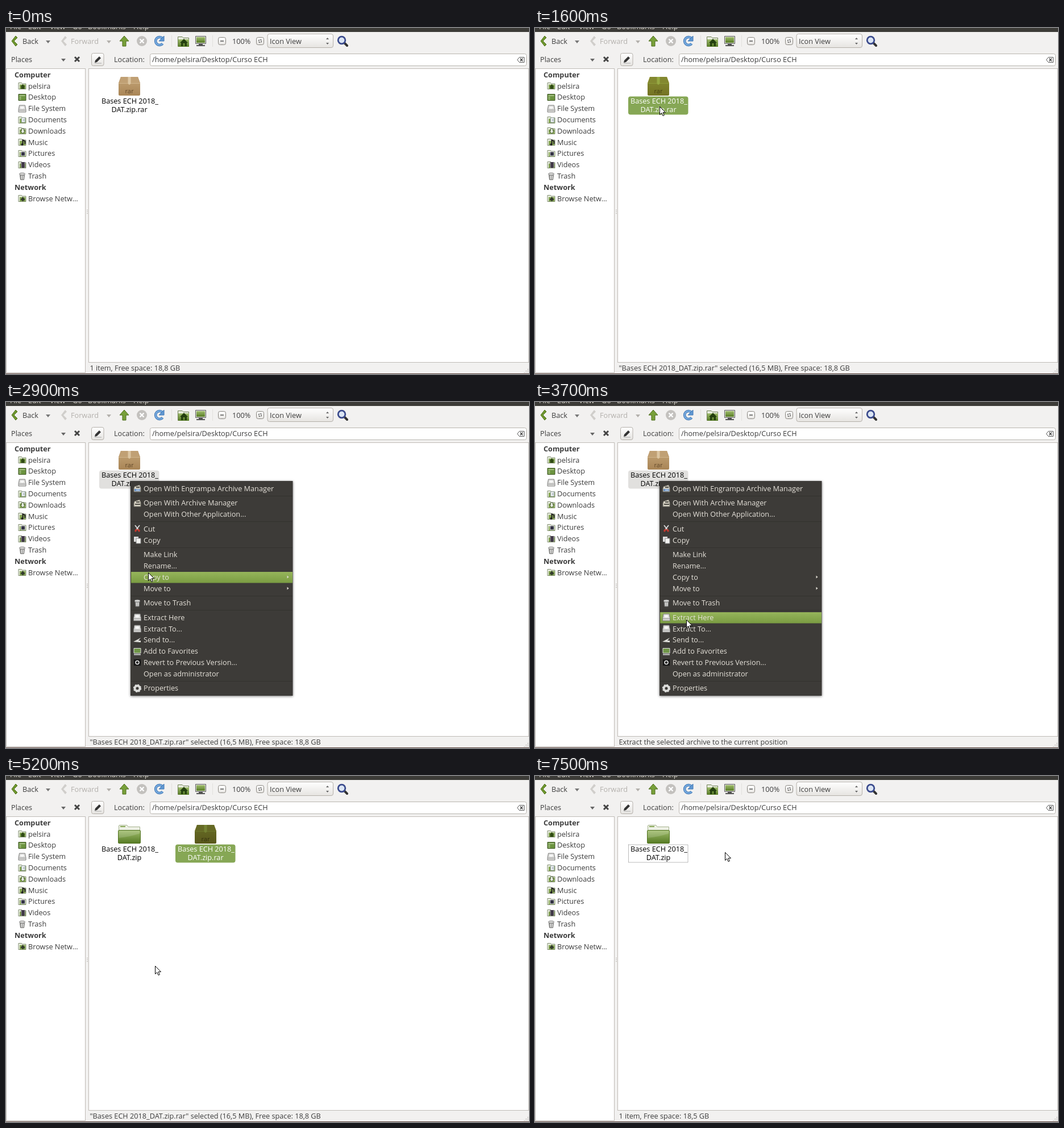
An HTML page that plays this animation: 920 px wide and 609 px high, repeating every 8 s.

```html
<!DOCTYPE html>
<html lang="en">
<head>
<meta charset="utf-8">
<title>File manager: extract an archive</title>
<style>
html, body { margin: 0; width: 100%; height: 100%; overflow: hidden; background: #f2f1f0; }
#stage { display: block; width: 920px; height: 609px; font: 12.68px "Open Sans", "Noto Sans", sans-serif; fill: #3c3c3c; }
.b { font-weight: 700; }
.mid { text-anchor: middle; }
.file { fill: #000; }
.off { fill: #b3b0ac; }
#menu text { fill: #e6e2da; }
.run { animation: 8s step-end infinite; }

#pointer { animation-name: pointer; }
@keyframes pointer {
  0% { transform: translate(64px, -30px); }
  1.25% { transform: translate(64px, 0); }
  2.5% { transform: translate(110px, 25px); }
  3.75% { transform: translate(150px, 50px); }
  5% { transform: translate(185px, 72px); }
  6.25% { transform: translate(207px, 88px); }
  7.5% { transform: translate(219px, 98px); }
  8.75% { transform: translate(225px, 105px); }
  16.25% { transform: translate(215px, 114px); }
  17.5% { transform: translate(209px, 126px); }
  18.75% { transform: translate(215px, 134px); }
  20% { transform: translate(219px, 138px); }
  36.25% { transform: translate(250px, 300px); }
  37.5% { transform: translate(255px, 328px); }
  38.75% { transform: translate(259px, 355px); }
  40% { transform: translate(262px, 374px); }
  42.5% { transform: translate(264px, 379px); }
  43.75% { transform: translate(266px, 383px); }
  57.5% { transform: translate(266px, 360px); }
  58.75% { transform: translate(266px, 343px); }
  61.25% { transform: translate(266px, 342px); }
  65% { transform: translate(262px, 334px); }
  70% { transform: translate(272px, 285px); }
  71.25% { transform: translate(284px, 235px); }
  73.75% { transform: translate(289px, 196px); }
  75% { transform: translate(294px, 165px); }
  76.25% { transform: translate(299px, 142px); }
  78.75% { transform: translate(313px, 140px); }
  80% { transform: translate(326px, 138px); }
  81.25% { transform: translate(334px, 136px); }
  83.75% { transform: translate(334px, 134px); }
}
#menu { animation-name: menu; }
@keyframes menu { 0%, 47.5% { opacity: 0; } 27.5% { opacity: 1; } }
#hot { animation-name: hot; }
@keyframes hot {
  0% { transform: translateY(299px); opacity: 0; }
  36.25% { transform: translateY(299px); opacity: 1; }
  37.5% { transform: translateY(318.5px); opacity: 1; }
  38.75% { transform: translateY(344.5px); opacity: 1; }
  40% { transform: translateY(370px); opacity: 1; }
}
#archive { animation-name: archive; }
@keyframes archive {
  0% { transform: none; opacity: 1; }
  52.5% { transform: translate(134px, 0); opacity: 1; }
  91.25% { transform: translate(134px, 0); opacity: 0; }
}
#box { isolation: isolate; animation-name: hover; }
@keyframes hover {
  0%, 27.5%, 91.25% { filter: brightness(1); }
  7.5%, 76.25% { filter: brightness(1.3); }
}
#tint { mix-blend-mode: multiply; animation-name: tint; }
@keyframes tint {
  0%, 27.5%, 70%, 91.25% { fill: transparent; }
  13.75%, 50%, 87.5% { fill: #86a850; }
}
#plate { animation-name: plate; }
@keyframes plate {
  0%, 70%, 91.25% { fill: transparent; }
  13.75%, 50%, 87.5% { fill: #86a755; }
  27.5% { fill: #e1e0de; }
}
#label { animation-name: label; }
@keyframes label {
  0%, 27.5%, 70%, 91.25% { fill: #000; }
  13.75%, 50%, 87.5% { fill: #fff; }
}
#folder { animation-name: folder; }
@keyframes folder { 0% { opacity: 0; } 52.5% { opacity: 1; } }
#focus { animation-name: focus; }
@keyframes focus { 0% { opacity: 0; } 93.75% { opacity: 1; } }
#status { animation-name: status; }
@keyframes status {
  0%, 91.25% { transform: translateY(0); }
  13.75%, 50%, 87.5% { transform: translateY(-30px); }
  38.75% { transform: translateY(-60px); }
  40% { transform: translateY(-90px); }
  70% { transform: translateY(-120px); }
  93.75% { transform: translateY(-150px); }
}
</style>
</head>
<body>
<svg id="stage" viewBox="0 0 920 609">
<defs>
  <linearGradient id="green" x2="0" y2="1"><stop stop-color="#a0bd6d"/><stop offset="1" stop-color="#567b24"/></linearGradient>
  <linearGradient id="bar" x2="0" y2="1"><stop stop-color="#96b55b"/><stop offset="1" stop-color="#7a9c42"/></linearGradient>
  <linearGradient id="front" x2="0" y2="1"><stop stop-color="#c3a477"/><stop offset="1" stop-color="#a98556"/></linearGradient>
  <linearGradient id="btn" x2="0" y2="1"><stop stop-color="#fff"/><stop offset="1" stop-color="#e6e4e1"/></linearGradient>
  <filter id="shade" x="-5%" y="-5%" width="110%" height="110%"><feDropShadow dx="0" dy="1" stdDeviation="2.2" flood-opacity=".55"/></filter>

  <path id="down" d="M-4-2H4L0 3Z"/>
  <path id="chevron" d="M7-9L10-6 4 0 10 6 7 9 0 0Z"/>
  <g id="dir">
    <path d="M-6.5 5.5V-5.5H-1L0-4H6.5V5.5Z" fill="#f0f2ea" stroke="#7f8c6c"/>
    <path d="M-4.5-2.5H6V5H-4.5Z" fill="#86a655"/>
  </g>
  <g id="home"><use href="#dir"/><path d="M-3 1L1-3 5 1H4V5H-2V1Z" fill="#2f4a14"/></g>
  <g id="desk"><path d="M-6.5-5.5h13v11h-13z" fill="#6c9440" stroke="#3d5523"/><path d="M-5-3H5M-5 0H-2M-5 3H-2" stroke="#d5e3c0"/></g>
  <g id="disk"><path d="M-5-6H5L6.5 2V6H-6.5V2Z" fill="#d9d9d7" stroke="#80807e"/><path d="M-6 2.5H6" stroke="#999"/><ellipse cy="-2" rx="3.5" ry="2" fill="#f7f7f7"/></g>
  <g id="docs"><use href="#dir"/><path d="M-1-4H5V4H-1Z" fill="#fff" stroke="#8b9b9b"/><path d="M1-1H4M1 1H4" stroke="#789"/></g>
  <g id="down2"><use href="#dir"/><path d="M-1-4H3V0H5L1 5-3 0H-1Z" fill="#e8eee2" stroke="#4b5d38"/></g>
  <g id="note"><use href="#dir"/><path d="M1 4V-4L5-2V3" fill="none" stroke="#222" stroke-width="2"/><circle cx="0" cy="4" r="2" fill="#222"/></g>
  <g id="pic"><use href="#dir"/><path d="M-2-3H5V4H-2Z" fill="#334" stroke="#ddd"/></g>
  <g id="film"><use href="#dir"/><path d="M-2-5H5V5H-2Z" fill="#3b3342"/><path d="M-1-4V5M4-4V5" stroke="#ccc" stroke-dasharray="1 1"/></g>
  <g id="bin"><path d="M-4-3H4L3 6H-3Z" fill="#a8a8a6" stroke="#6e6e6c"/><ellipse cy="-4" rx="5" ry="2" fill="#dededc" stroke="#777"/><path d="M-1-1V5M2-1V5" stroke="#eee"/></g>
  <g id="net"><use href="#dir"/><path d="M-3 2L1-3 5 2 1 5Z" fill="#333c2c"/></g>
  <g id="pack"><path d="M-5-3L4-6 6-1V6H-6V0Z" fill="#d4d0c2" stroke="#77746a"/><path d="M-4 2H5M-2-2H4" stroke="#4d4b45" stroke-width="2"/></g>
  <g id="packblue"><use href="#pack"/><path d="M-5 1H5V5H-5Z" fill="#6b92c4"/><path d="M-2 3H4" stroke="#fff"/></g>
  <g id="cut"><path d="M-4-6L3 3M4-6L-3 3" stroke="#ddd" stroke-width="1.8"/><path d="M-1 1L-4 5M1 1L4 5" stroke="#c0392f" stroke-width="3"/></g>
  <g id="copy"><path d="M-6-6H2V3H-6Z" fill="#ddd"/><path d="M-2-3H6V6H-2Z" fill="#f4f4f2" stroke="#888"/></g>
  <path id="send" d="M-7 3L6-4 2 1H6V4Z" fill="#dededa"/>
  <g id="screen"><path d="M-6-5.5H6V3H-6Z" fill="#6f9647" stroke="#ddd"/><path d="M-6 5.5H6" stroke="#ccc" stroke-width="2"/></g>
  <g id="back"><path d="M-6-5H6V6H-6Z" fill="#151515"/><circle r="3" cy=".5" fill="none" stroke="#eee" stroke-width="1.5"/></g>
  <g id="gear"><circle r="4.5" fill="none" stroke="#dcdcda" stroke-width="4" /><circle r="6" fill="none" stroke="#dcdcda" stroke-width="2.4" stroke-dasharray="2.4 2.3"/></g>
</defs>

<rect width="920" height="609" fill="#f2f1f0"/>
<rect width="920" height="7" fill="#3c3b37"/>
<g id="top" fill="#dfdbd2"></g>

<!-- toolbar -->
<use href="#chevron" x="10" y="23" fill="#6f972f" stroke="#4e7018"/>
<text x="29" y="27.5">Back</text>
<use href="#down" x="74" y="24" fill="#777"/>
<use href="#chevron" x="97" y="23" fill="#d0cecb"/>
<text x="114" y="27.5" class="off">Forward</text>
<use href="#down" x="181" y="24" class="off"/>
<path d="M208 14L216 23H211V32H205V23H200Z" fill="#78a03a" stroke="#4a6b18"/>
<circle cx="239" cy="23" r="9" fill="#c3c1be"/>
<path d="M235.5 19.5l7 7m0-7l-7 7" stroke="#fff" stroke-width="2.4"/>
<path d="M275.5 27.5A7 7 0 1 1 275 18" fill="none" stroke="#4379b5" stroke-width="4.6"/>
<path d="M275.5 27.5A7 7 0 1 1 275 18" fill="none" stroke="#75a9de" stroke-width="2.6"/>
<path d="M278 14V23H269Z" fill="#5f97d2" stroke="#4379b5"/>
<path d="M291.5 13V33M363.5 13V33" stroke="#e2e0dd"/>
<path d="M302.5 32.500V15.500H310L312 17.500H321.500V32.500Z" fill="#e8ecdf" stroke="#6d7f52"/>
<path d="M303 20H322V33H303Z" fill="url(#green)"/>
<path d="M306 26L313 19 320 26H318V32H314.500V27H311.500V32H308V26Z" fill="#24400f"/>
<path d="M333.500 14.500H351.500V27.500H333.500Z" fill="#e2e2e0" stroke="#5b5b59"/>
<path d="M335 16H350V26H335Z" fill="url(#green)"/>
<path d="M339 28H346V30H350V32H335V30H339Z" fill="#555"/>
<g fill="url(#btn)" stroke="#88857f">
  <rect x="373.5" y="16.5" width="13" height="13" rx="3"/>
  <rect x="440.5" y="16.5" width="13" height="13" rx="3"/>
  <rect x="460" y="10.500" width="115.500" height="24" rx="3.500" stroke="#b4b0aa"/>
  <rect x="150.500" y="44.500" width="21.500" height="22" rx="3" stroke="#b4b0aa"/>
</g>
<path d="M377 23H383" stroke="#555" stroke-width="1.500"/>
<circle cx="447" cy="23" r="2.500" fill="none" stroke="#555" stroke-width="1.400" stroke-dasharray="2.500 1.400"/>
<text x="398" y="27.500">100%</text>
<text x="464" y="27.500">Icon View</text>
<path d="M563 20L565.500 17 568 20ZM563 26L565.500 29 568 26Z" fill="#666"/>
<path d="M595 26L600 31" stroke="#333" stroke-width="4" stroke-linecap="round"/>
<circle cx="590.500" cy="21.500" r="6.300" fill="#dbe5f4" stroke="#3a4a8c" stroke-width="2.800"/>

<!-- location row -->
<text x="9" y="60">Places</text>
<use href="#down" x="101" y="56" fill="#666"/>
<path d="M121 51L129 59M129 51L121 59" stroke="#444" stroke-width="3"/>
<path d="M156 61L157 57 164 50 167 53 160 60Z" fill="#333"/><path d="M156 62H168" stroke="#aaa"/>
<text x="190" y="60">Location:</text>
<rect x="253.500" y="45.500" width="662" height="21" rx="3" fill="#fff" stroke="#b9b5af"/>
<text x="257" y="60">/home/pelsira/Desktop/Curso ECH</text>
<path d="M899.500 56L903 51.500H911.500V60.500H903Z" fill="#fff" stroke="#555"/>
<path d="M904.500 53.500L909 58.500M909 53.500L904.500 58.500" stroke="#444" stroke-width="1.500"/>

<!-- panes -->
<rect x=".5" y="71.500" width="139" height="535" fill="#fff" stroke="#bfbbb6"/>
<rect x="145.500" y="71.500" width="774" height="517" fill="#fff" stroke="#bfbbb6"/>
<path d="M143 320V328" stroke="#b5b2ae" stroke-width="2" stroke-dasharray="1 2"/>
<path d="M918 600V607M915 603V607M912 606V607" stroke="#bbb8b4" stroke-width="1.500" stroke-dasharray="1.500 1.500"/>
<rect y="608" width="920" height="1" fill="#57403a"/>
<g id="places"></g>
<svg x="147" y="590" width="760" height="17"><g id="status" class="run"></g></svg>

<!-- files -->
<g id="folder" class="run">
  <path d="M198.500 118V88Q198.500 86.500 200 86.500H213L215 89.500H235.500V118Z" fill="#eef1e6" stroke="#a5b28e"/>
  <path d="M201 89H210" stroke="#86a655" stroke-width="2"/>
  <rect x="197.500" y="95.500" width="39" height="23" rx="1.500" fill="url(#green)" stroke="#557527"/>
  <path d="M198.500 97V109Q218 107 235.500 101V96.500H198.500Z" fill="#fff" opacity=".15"/>
  <g class="mid file"><text x="218" y="133">Bases ECH 2018_</text><text x="217" y="147.500">DAT.zip</text></g>
  <rect id="focus" class="run" x="164.500" y="121" width="104.500" height="31" fill="none" stroke="#777" stroke-dasharray="1 1"/>
</g>
<g id="archive" class="run">
  <g id="box" class="run">
    <path d="M202 86H232L236 97V117Q236 119 234 119H200Q198 119 198 117V97Z" fill="url(#front)"/>
    <path d="M202 86H232L236 97H198Z" fill="#c0a074"/>
    <path d="M198 97.500H236" stroke="#d0b48b"/>
    <path d="M214.500 86H219.500V98L217 100 214.500 98Z" fill="#dcc6a2"/>
    <text x="217" y="115" class="mid" style="font-size:11px;fill:#634a2b">rar</text>
    <path id="tint" class="run" d="M202 86H232L236 97V117Q236 119 234 119H200Q198 119 198 117V97Z"/>
  </g>
  <rect id="plate" class="run" x="164" y="120.500" width="105.500" height="32" rx="4"/>
  <g id="label" class="run mid"><text x="218" y="133" fill="inherit">Bases ECH 2018_</text><text x="217" y="147.500">DAT.zip.rar</text></g>
</g>

<g id="menu" class="run">
  <rect x="219" y="139" width="285.500" height="378" fill="#3c3b37" filter="url(#shade)"/>
  <rect id="hot" class="run" x="220" width="284" height="19.500" fill="url(#bar)"/>
  <g id="items"></g>
</g>

<path id="pointer" class="run" d="M.5 .5V14.500L3.800 11.500 6 16.600 8.300 15.600 6.100 10.700H10.500Z" fill="#fff" stroke="#000"/>
</svg>

<script>
const put = (id, list, draw) => { document.getElementById(id).innerHTML = list.map(draw).join(''); };
const text = (x, y, s, cls = '') => `<text x="${x}" y="${y}" class="${cls}">${s}</text>`;
const icon = (id, x, y) => id ? `<use href="#${id}" x="${x}" y="${y}"/>` : '';

put('top', [[7, 'File'], [39, 'Edit'], [77, 'View'], [117, 'Go'], [144, 'Bookmarks'], [224, 'Help']],
  ([x, s]) => text(x, 2, s));

put('places', [
  ['Computer'], ['pelsira', 'home'], ['Desktop', 'desk'], ['File System', 'disk'],
  ['Documents', 'docs'], ['Downloads', 'down2'], ['Music', 'note'], ['Pictures', 'pic'],
  ['Videos', 'film'], ['Trash', 'bin'], ['Network'], ['Browse Netw…', 'net']
], ([s, id], i) => {
  const y = 82.3 + i * 19.8;
  return icon(id, 28.5, Math.round(y)) + text(id ? 39 : 15, y + 4.5, s, id ? '' : 'b');
});

put('status', [
  '1 item, Free space: 18,8 GB',
  '"Bases ECH 2018_DAT.zip.rar" selected (16,5 MB), Free space: 18,8 GB',
  'Move each selected item to the Trash',
  'Extract the selected archive to the current position',
  '2 items, Free space: 18,8 GB',
  '1 item, Free space: 18,5 GB'
], (s, i) => text(.5, 13 + i * 30, s));

// an empty entry is a separator
let y = 132.3;
put('items', [
  ['Open With Engrampa Archive Manager', 'packblue'], [],
  ['Open With Archive Manager', 'pack'], ['Open With Other Application...'], [],
  ['Cut', 'cut'], ['Copy', 'copy'], [],
  ['Make Link'], ['Rename...'], ['Copy to', '', 1], ['Move to', '', 1], [],
  ['Move to Trash', 'bin'], [],
  ['Extract Here', 'disk'], ['Extract To...', 'disk'], ['Send to...', 'send'],
  ['Add to Favorites', 'screen'], ['Revert to Previous Version...', 'back'], ['Open as administrator'], [],
  ['Properties', 'gear']
], ([s, id, sub]) => {
  if (!s) {
    y += 5.8;
    return `<path d="M220 ${Math.round(y + 7) + .5}H504" stroke="#33322e"/>`;
  }
  y += 19.8;
  return icon(id, 231, Math.round(y)) + text(242, y + 4.6, s)
    + (sub ? `<path d="M494.500 ${y - 2.5}l3 2.500-3 2.500z" fill="#dfdbd2"/>` : '');
});
</script>
</body>
</html>
```
